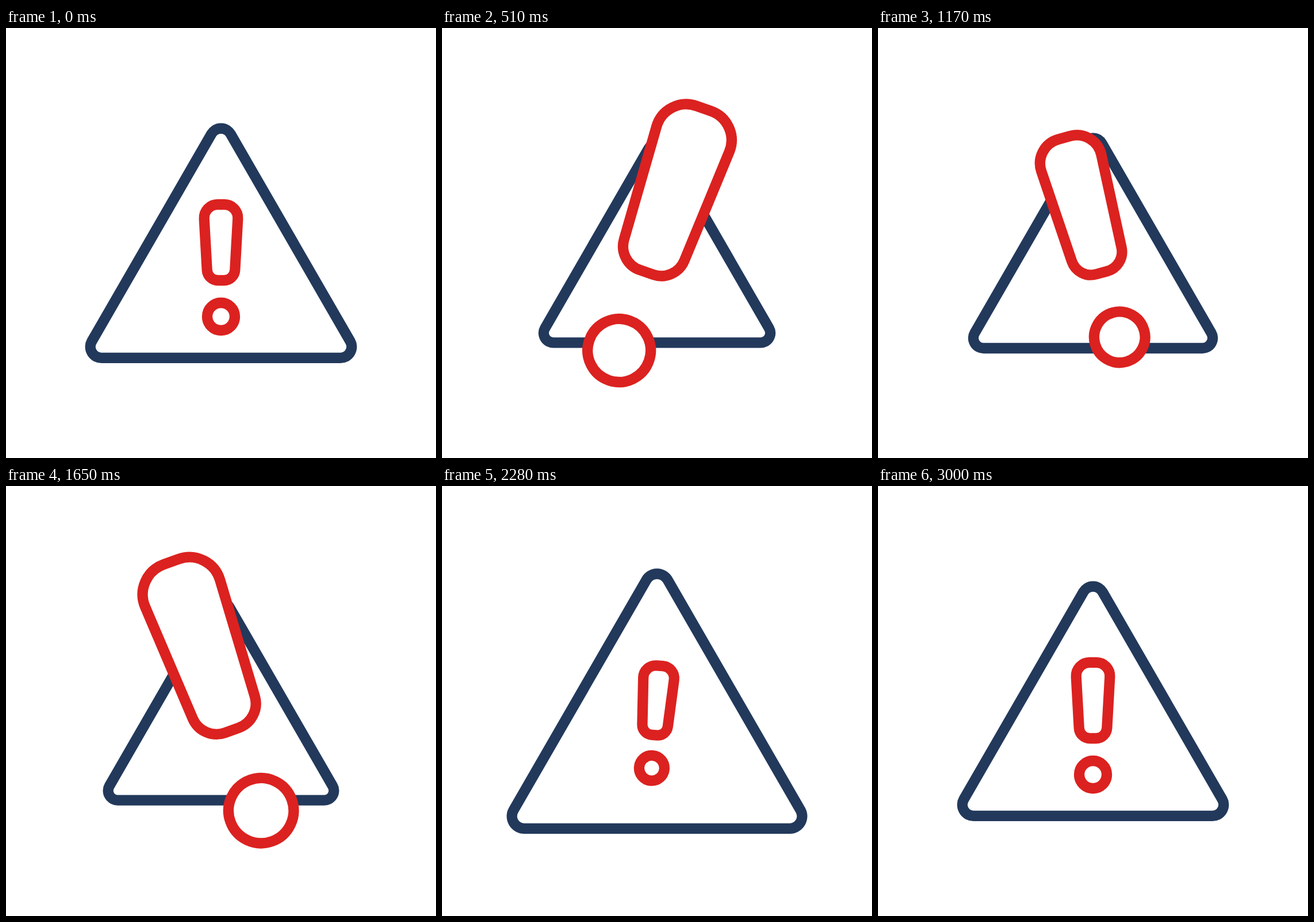
These frames come from a looping animation (748x748 px, 5030 ms). An HTML page:

```html
<!DOCTYPE html>
<html lang="en">
<head>
<meta charset="utf-8">
<title>Warning sign</title>
<style>
  html, body { margin: 0; width: 100%; height: 100%; overflow: hidden; background: #fff; }
  svg { display: block; width: 100%; height: 100%; }
  path, circle { fill: #fff; stroke-width: 18.3; vector-effect: non-scaling-stroke; }
  #sign { stroke: #22395b; }
  #mark { stroke: #db2220; }
</style>
</head>
<body>
<svg viewBox="0 0 748 748">
  <g id="sign">
    <path d="M-208 199.8A19.3 19.3 0 0 1-224.7 170.9L-16.7-189.6A19.3 19.3 0 0 1 16.7-189.6L224.7 170.9A19.3 19.3 0 0 1 208 199.8Z"/>
  </g>
  <g id="mark">
    <path d="M-5.8-66H5.8A23.5 23.5 0 0 1 29.3-41.2L24.3 48.1A19 19 0 0 1 5.3 66H-5.3A19 19 0 0 1-24.3 48.1L-29.3-41.2A23.5 23.5 0 0 1-5.8-66Z"/>
    <circle cy="129" r="24"/>
  </g>
</svg>
<script>
  const LOOP = 5030, STEP = 30, END = 3000;
  const FLIP = 940, FLIP_SPAN = 225; // when and how fast the tilt changes side

  const smooth = p => (1 - Math.cos(Math.PI * p)) / 2;
  const settle = p => smooth(1 - (1 - p) ** 1.6);
  const spring = p => 1 - (1 - p * p) ** 2 * Math.cos(1.25 * Math.PI * p);

  const rest = { sign: 1, mark: 1, tilt: 0, sway: 0 };
  const swing = { sign: .862, mark: 2.37, tilt: 20.1, sway: 34 };
  const middle = { sign: .949, mark: 1.3, tilt: 20.1, sway: 0 };
  const rebound = { sign: 1.122, mark: .906, tilt: -4.9, sway: 0 };

  // The sign reaches its middle pose a little after the mark.
  const beats = middleTime => [
    { at: 0, pose: rest },
    { at: 420, pose: swing, ease: smooth },
    { at: middleTime, pose: middle, ease: smooth },
    { at: 1620, pose: swing, ease: settle },
    { at: 2200, pose: rebound, ease: smooth },
    { at: END, pose: rest, ease: spring }
  ];
  const markBeats = beats(920);
  const signBeats = beats(985);

  function blend(list, time, part) {
    const next = list.findIndex(beat => beat.at >= time && beat.ease);
    const from = list[next - 1], to = list[next];
    const amount = to.ease((time - from.at) / (to.at - from.at));
    return from.pose[part] + (to.pose[part] - from.pose[part]) * amount;
  }

  const sign = document.getElementById('sign');
  const mark = document.getElementById('mark');

  function draw(time) {
    const size = blend(markBeats, time, 'mark');
    const side = Math.tanh((FLIP - time) / FLIP_SPAN);
    const angle = side * blend(markBeats, time, 'tilt');
    const x = 374 + Math.sign(side) * blend(markBeats, time, 'sway');
    const y = 373 - 74 * Math.max(0, size - 1) ** .8;
    sign.setAttribute('transform', `translate(374 374) scale(${blend(signBeats, time, 'sign')})`);
    mark.setAttribute('transform', `translate(${x} ${y}) rotate(${angle}) scale(${size})`);
  }

  const start = performance.now();
  function tick() {
    const time = (performance.now() - start) % LOOP;
    draw(Math.min(END, Math.floor(time / STEP) * STEP));
    requestAnimationFrame(tick);
  }
  tick();
</script>
</body>
</html>
```
